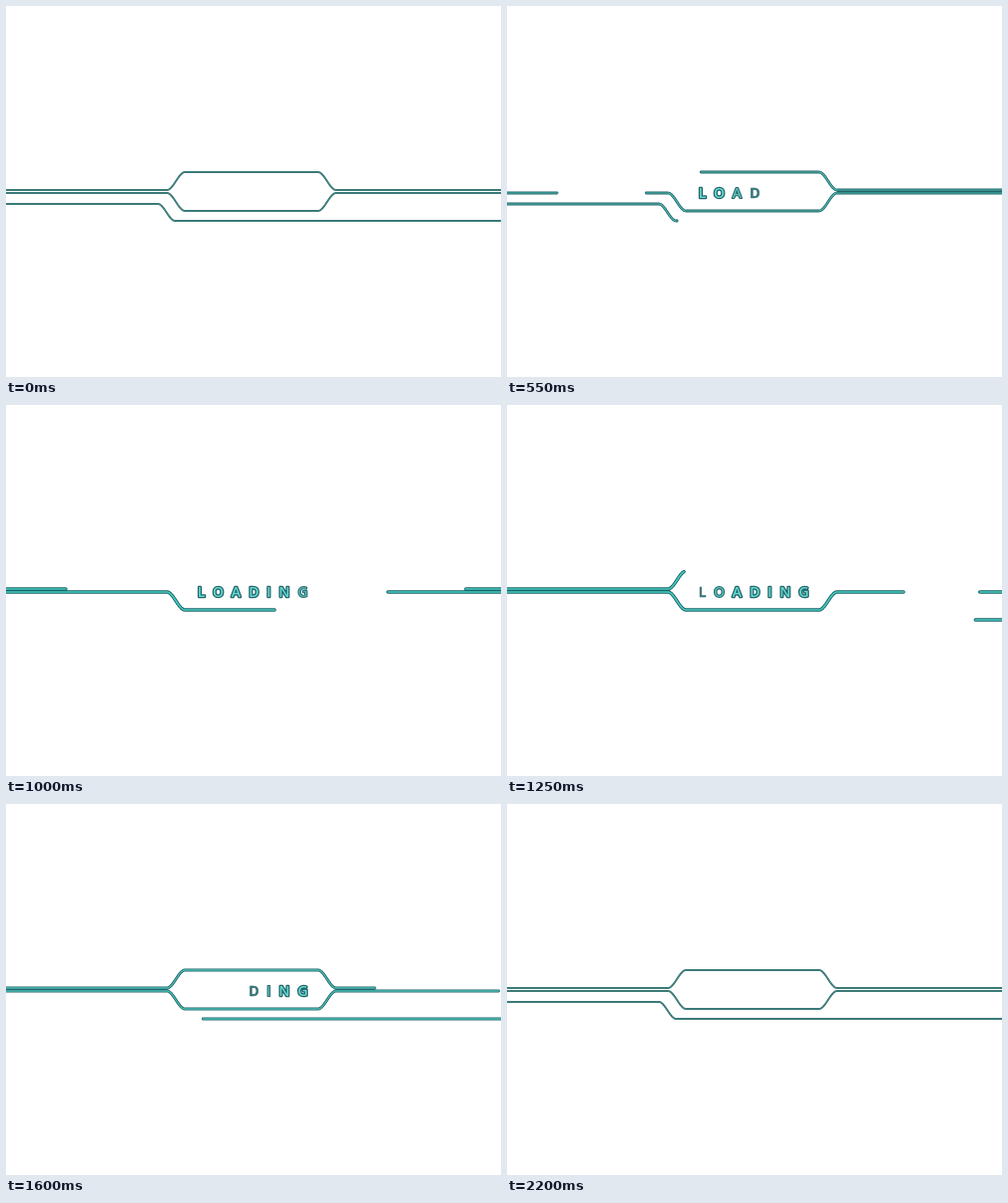
Animation of 498x373 px, one loop 2.25 s. Source, as an HTML page with a canvas:

```html
<!DOCTYPE html>
<html lang="en">
<head>
<meta charset="utf-8">
<title>Loading</title>
<style>
html, body { margin: 0; width: 100%; height: 100%; overflow: hidden; background: #fff; }
canvas { display: block; }
</style>
</head>
<body>
<canvas id="stage" width="498" height="373"></canvas>
<script>
const W = 498, H = 373, LOOP = 2250, STEP = 50;
const ctx = document.getElementById('stage').getContext('2d');

const clamp = v => Math.min(1, Math.max(0, v));
const smooth = v => { v = clamp(v); return v * v * (3 - 2 * v); };
const mix = (a, b, k) => `rgb(${a.map((v, i) => Math.round(v + (b[i] - v) * k))})`;

// Sine ease over a progress given by [time, progress] keys.
function ease(t, keys) {
  let u = t < keys[0][0] ? 0 : 1;
  for (let i = 1; i < keys.length; i++) {
    const [t0, u0] = keys[i - 1], [t1, u1] = keys[i];
    if (t >= t0 && t < t1) u = u0 + (u1 - u0) * (t - t0) / (t1 - t0);
  }
  return (1 - Math.cos(Math.PI * u)) / 2;
}

const bulge = x => smooth((x - 162) / 18) - smooth((x - 314) / 18);

// Each wire is wiped out along its length, then drawn again behind the wipe.
const wires = [
  { y: x => 185 - 18 * bulge(x), wipe: [[63, 0], [1194, 1]],
    draw: [[690, 0], [1250, .408], [1600, .663], [1850, .94], [1910, 1]] },
  { y: x => 188 + 18 * bulge(x), wipe: [[60, 0], [1437, 1]],
    draw: [[262, 0], [1662, 1]] },
  { y: x => 199 + 17 * smooth((x - 153) / 17), wipe: [[75, 0], [865, 1]],
    draw: [[1125, 0], [1965, 1]], fromRight: true }
];

function tracePart(y, from, to) {
  if (to - from < .5) return;
  ctx.moveTo(from, y(from));
  for (let x = Math.ceil(from); x < to; x++) ctx.lineTo(x, y(x));
  ctx.lineTo(to, y(to));
}

function drawWires(t) {
  const glow = clamp(1.15 * Math.sin(Math.PI * t / 2200) ** 2);
  const path = () => {
    ctx.beginPath();
    for (const { y, wipe, draw, fromRight } of wires) {
      const gone = W * ease(t, wipe), back = W * ease(t, draw);
      tracePart(y, 0, fromRight ? W - gone : back);
      tracePart(y, fromRight ? W - back : gone, W);
    }
  };
  path();
  ctx.lineWidth = 1.9 + 1.5 * glow;
  ctx.strokeStyle = mix([47, 105, 107], [28, 98, 102], glow);
  ctx.stroke();
  ctx.lineWidth = .7 + .9 * glow;
  ctx.strokeStyle = mix([80, 155, 148], [67, 203, 194], glow);
  ctx.stroke();
}

const letters = [['L', 196.5], ['O', 213.5], ['A', 231.5], ['D', 249.5],
                 ['I', 264.5], ['N', 280], ['G', 298.5]];

function drawLetters(t) {
  letters.forEach(([char, x], i) => {
    const age = t - 120 - 118 * i, left = 1190 - age;
    if (age <= 0 || left <= 0) return;
    const k = smooth(Math.min(age, left) / 280);
    ctx.globalAlpha = clamp(Math.min(age, left) / 50);
    ctx.lineWidth = .3 + 2.3 * k;
    ctx.strokeStyle = 'rgb(38,100,105)';
    ctx.strokeText(char, x, 193);
    ctx.fillStyle = mix([48, 98, 102], [98, 218, 211], k);
    ctx.fillText(char, x, 193);
  });
  ctx.globalAlpha = 1;
}

function render(now) {
  const t = Math.floor(now % LOOP / STEP) * STEP;
  ctx.fillStyle = '#fff';
  ctx.fillRect(0, 0, W, H);
  drawWires(t);
  drawLetters(t);
  requestAnimationFrame(render);
}

ctx.lineCap = ctx.lineJoin = 'round';
ctx.textAlign = 'center';
ctx.font = '600 14px "Open Sans", "Noto Sans", sans-serif';
render(0);
</script>
</body>
</html>
```
